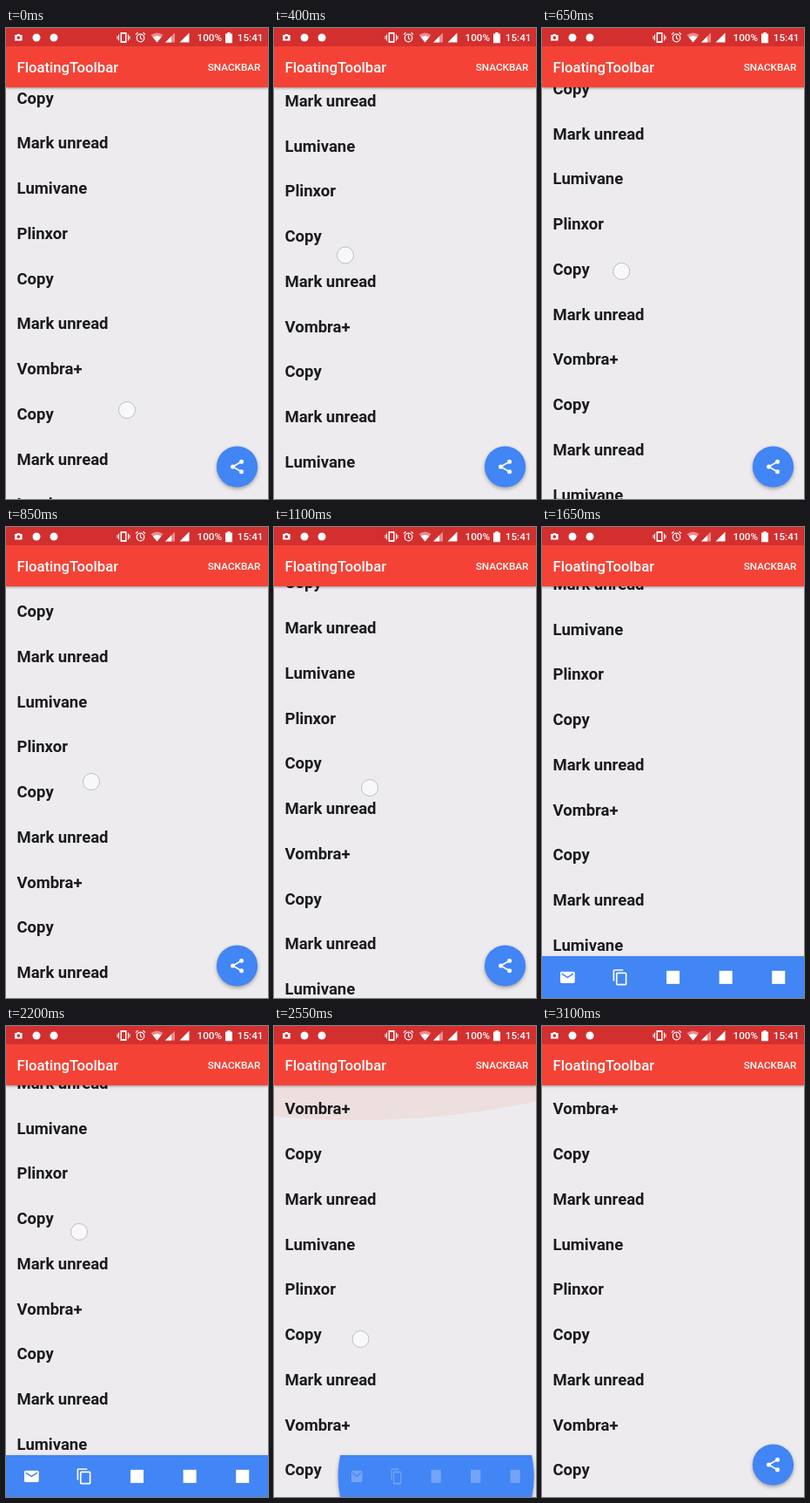
These frames come from a looping animation (301 by 540 pixels, 3.5 s). An HTML page:

```html
<!DOCTYPE html>
<html lang="en">
<head>
<meta charset="utf-8">
<title>FloatingToolbar</title>
<style>
  html, body { margin: 0; width: 100%; height: 100%; overflow: hidden; background: #edebee; }
  svg { display: block; width: 301px; height: 540px; font-family: Roboto, sans-serif; }
  #list { font-size: 18.5px; font-weight: 700; fill: #1b1b1f; }
  #bar { filter: drop-shadow(0 1px 1.5px rgba(0, 0, 0, .4)); }
  #float { filter: drop-shadow(0 2px 2px rgba(0, 0, 0, .32)); }
  .label { fill: #fff; font-weight: 500; font-size: 11.7px; }
</style>
</head>
<body>
<svg viewBox="0 0 301 540">
  <clipPath id="dock"><rect y="492" width="301" height="48"/></clipPath>
  <rect width="301" height="540" fill="#edebee"/>
  <circle id="glow" cx="95" r="1000" fill="#e64a19"/>
  <g id="list"></g>

  <g id="float">
    <g id="clip">
      <circle id="blob" fill="#4285f4"/>
      <g id="icons" fill="#fff"></g>
    </g>
    <g id="share" fill="#fff">
      <path d="M5-5.8L-5 0L5 5.8" fill="none" stroke="#fff" stroke-width="1.7"/>
      <circle cx="5" cy="-5.8" r="2.5"/><circle cx="-5" r="2.5"/><circle cx="5" cy="5.8" r="2.5"/>
    </g>
  </g>

  <g id="bar">
    <rect width="301" height="68" fill="#f44336"/>
    <rect width="301" height="21" fill="#d32f2f"/>
  </g>
  <text class="label" x="12.5" y="51.3" style="font-size:16.7px">FloatingToolbar</text>
  <text class="label" x="292.4" y="49.2" text-anchor="end">SNACKBAR</text>

  <g fill="#fff">
    <path fill-rule="evenodd" d="M10 8h2l1-1h2.600l1 1h2v6.500H10zM14.300 9.300a1.800 1.800 0 1 0 .01 0z"/>
    <circle cx="35" cy="11" r="4.5"/>
    <circle cx="55" cy="11" r="4.5"/>
    <path fill-rule="evenodd" d="M131.500 5h7v12h-7zM133 7v8h4V7z"/>
    <path d="M129.500 7.500v7M140.500 7.500v7M128 9v4M142 9v4" stroke="#fff"/>
    <g fill="none" stroke="#fff" stroke-width="1.2">
      <circle cx="154.5" cy="11.5" r="4.3"/>
      <path d="M154.5 8.5v3.2l2 1.3M149 7.5l2.5-2.2M160 7.5l-2.5-2.2"/>
    </g>
    <g opacity=".45">
      <path d="M166.5 8Q173.5 3 180.5 8L173.5 16.5z"/>
      <path d="M194 5.5v11h-11z"/>
    </g>
    <path d="M168.6 10.5Q173.5 7.5 178.4 10.5L173.5 16.5z"/>
    <path d="M190 9.5v7h-7z"/>
    <path d="M210.5 5.5v11h-11z"/>
    <path d="M252 6.5h2.3V5h3.4v1.5h2.3v10.8h-8z"/>
  </g>
  <text class="label" x="219.5" y="15.3">100%</text>
  <text class="label" x="295.5" y="15.3" text-anchor="end">15:41</text>
  <circle id="finger" r="9.5" fill="#fff" fill-opacity=".65" stroke="#a9abc9" stroke-opacity=".75"/>
</svg>
<script>
const LOOP = 3500, STEP = 50, PITCH = 51.75;
const LABELS = ['Vombra+', 'Copy', 'Mark unread', 'Lumivane', 'Plinxor', 'Copy', 'Mark unread'];
const MAIL = 'M20 4H4c-1.1 0-2 .9-2 2v12c0 1.1.9 2 2 2h16c1.1 0 2-.9 2-2V6c0-1.1-.9-2-2-2zm0 4l-8 5-8-5V6l8 5 8-5z';
const COPY = 'M16 1H4c-1.1 0-2 .9-2 2v14h2V3h12V1zm3 4H8c-1.1 0-2 .9-2 2v14c0 1.1.9 2 2 2h11c1.1 0 2-.9 2-2V7c0-1.1-.9-2-2-2zm0 16H8V7h11v14z';
const SQUARE = 'M3 3h18v18H3z';

// Turning points of the drags.
const DRAG = [
  { time: 0, scroll: 66.6, x: 139, y: 438 },
  { time: 400, scroll: 115.1, x: 82, y: 260.5 },
  { time: 850, scroll: 50, x: 98, y: 292 },
  { time: 1350, scroll: 115.4, x: 122, y: 306 },
  { time: 1600, scroll: 132.9, x: 112, y: 270 },
  { time: 2200, scroll: 132.9, x: 84, y: 236 },
  { time: 2550, scroll: 0, x: 99.5, y: 359 }
];

const $ = id => document.getElementById(id);
const set = (id, attrs) => Object.entries(attrs).forEach(([k, v]) => $(id).setAttribute(k, v));
const mix = (a, b, p) => a + (b - a) * p;

function ramp(t, start, end) {
  const p = Math.min(1, Math.max(0, (t - start) / (end - start)));
  return p * p * (3 - 2 * p);
}
// Rises from 0 to 1, holds, then falls back.
const pulse = (t, a, b, c, d) => ramp(t, a, b) - ramp(t, c, d);

function dragAt(t) {
  const next = DRAG.findIndex(d => d.time > t);
  if (next < 0) return DRAG[DRAG.length - 1];
  const a = DRAG[next - 1], b = DRAG[next], p = ramp(t, a.time, b.time);
  return { scroll: mix(a.scroll, b.scroll, p), x: mix(a.x, b.x, p), y: mix(a.y, b.y, p) };
}

$('list').innerHTML = Array.from({ length: 14 }, (_, i) =>
  `<text x="12.5" y="${101.4 + i * PITCH}">${LABELS[i % LABELS.length]}</text>`).join('');
$('icons').innerHTML = [MAIL, COPY, SQUARE, SQUARE, SQUARE].map((d, i) =>
  `<path transform="translate(${(i - 2) * 60.6 - 10} -10) scale(.836)" d="${d}"/>`).join('');

function render(t) {
  const { scroll, x, y } = dragAt(t);
  const touching = t < 1500 || (t >= 2200 && t < 2650);
  set('list', { transform: `translate(0 ${-scroll})` });
  set('finger', { cx: x, cy: y, opacity: touching ? 1 : 0 });

  const pull = pulse(t, 2450, 2550, 2650, 3050);
  set('glow', { cy: 69 + 39 * pull - 1000, opacity: .07 * pull });

  // The button drops and slides to the middle while it spreads into the toolbar.
  const drop = pulse(t, 1150, 1250, 2750, 2850);
  const slide = pulse(t, 1150, 1405, 2450, 2720);
  const spread = pulse(t, 1260, 1640, 2450, 2720);
  const cx = mix(265.5, 150.5, slide), cy = mix(503, 516.3, drop), r = mix(23.6, 152.5, spread);
  set('blob', { cx, cy, r });
  set('clip', { 'clip-path': drop === 1 ? 'url(#dock)' : 'none' });
  set('icons', {
    transform: `translate(${cx} ${cy}) scale(${Math.min(1, r / 150)} 1)`,
    opacity: pulse(t, 1500, 1650, 2450, 2600)
  });
  set('share', { transform: `translate(${cx} ${cy})`, opacity: 1 - drop });
}

function loop() {
  render(Math.floor(performance.now() % LOOP / STEP) * STEP);
  requestAnimationFrame(loop);
}
loop();
</script>
</body>
</html>
```
